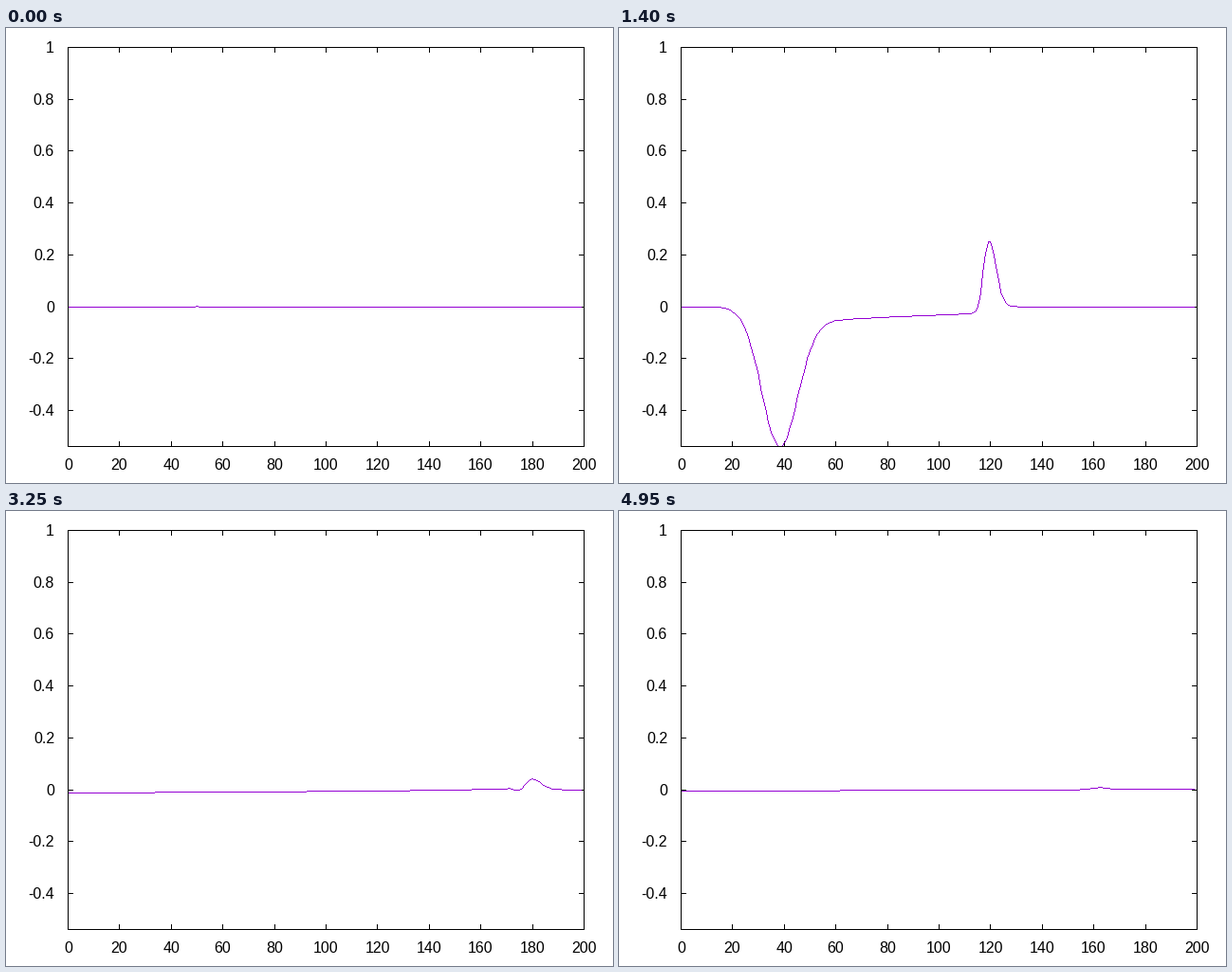
A matplotlib script that plays this animation: 640x480 px, repeating every 5000 ms.

```python
import numpy as np
import matplotlib.pyplot as plt
from matplotlib.animation import FuncAnimation
from matplotlib.collections import PolyCollection
from matplotlib.patches import Rectangle

WIDTH, HEIGHT, DPI = 640, 480, 100
LEFT, RIGHT, TOP, BOTTOM = 65, 609, 20, 441
X_MAX, Y_MIN, Y_MAX = 200, -0.53906, 1.0
TICK = 5
FRAMES, INTERVAL, STEPS = 100, 50, 5

CELLS, SOURCE, INTERFACE = 200, 50, 100
PERMITTIVITY, LOSS = 9.0, 0.01
CORNERS = np.array([[0, 0], [1, 0], [1, 1], [0, 1]])


def pulse(t):
    return np.exp(-(t - 30) ** 2 / 100)


def simulate():
    """1D FDTD: a pulse in free space meets a lossy dielectric half-space."""
    ez, hy = np.zeros(CELLS), np.zeros(CELLS)  # hy scaled by the impedance
    keep, curl = np.ones(CELLS), np.ones(CELLS)
    keep[INTERFACE:] = (1 - LOSS) / (1 + LOSS)
    curl[INTERFACE:] = 1 / PERMITTIVITY / (1 + LOSS)

    shots = []
    for t in range(STEPS * (FRAMES - 1) + 1):
        hy[:-1] += np.diff(ez)
        hy[SOURCE - 1] -= pulse(t)
        ez[0] = ez[1]  # absorbing left end
        ez[1:] = keep[1:] * ez[1:] + curl[1:] * np.diff(hy)
        ez[SOURCE] += pulse(t + 1)
        if t % STEPS == 0:
            shots.append(ez.copy())
    return shots


def nearest(v):
    return np.floor(np.asarray(v) + 0.5).astype(int)


def to_px(x):
    return nearest(LEFT + np.asarray(x) * (RIGHT - LEFT) / X_MAX)


def to_py(y):
    up = (np.clip(y, Y_MIN, Y_MAX) - Y_MIN) * (BOTTOM - TOP) / (Y_MAX - Y_MIN)
    return BOTTOM - nearest(up)


def trace_pixels(field):
    """Unit squares of a crisp one-pixel polyline through the field values."""
    pts = np.column_stack([to_px(np.arange(CELLS)), to_py(field)])
    runs = []
    for a, b in zip(pts[:-1], pts[1:]):
        n = np.abs(b - a).max()
        runs.append(nearest(a + np.outer(np.arange(n + 1) / n, b - a)))
    pixels = np.unique(np.concatenate(runs), axis=0)
    return (pixels[:, None, :] + CORNERS).astype(float)


fig = plt.figure(figsize=(WIDTH / DPI, HEIGHT / DPI), dpi=DPI, facecolor="white")
ax = fig.add_axes([0, 0, 1, 1])
ax.set_xlim(0, WIDTH)
ax.set_ylim(HEIGHT, 0)
ax.axis("off")


def bar(x0, y0, x1, y1, zorder):
    """Black bar covering the pixels x0..x1, y0..y1 inclusive."""
    ax.add_patch(Rectangle((x0, y0), x1 - x0 + 1, y1 - y0 + 1, facecolor="black",
                           linewidth=0, antialiased=False, zorder=zorder))


def label(x, y, text, ha):
    ax.text(x, y, text, ha=ha, va="baseline", color="black",
            family="Liberation Sans", fontsize=16 * 72 / DPI)


for value in range(0, X_MAX + 1, 20):
    px = int(to_px(value))
    bar(px, BOTTOM - TICK, px, BOTTOM, 1)
    bar(px, TOP, px, TOP + TICK, 1)
    label(px + 0.5, 466, str(value), "center")

for k in range(-2, 6):
    py = int(to_py(k / 5))
    bar(LEFT, py, LEFT + TICK, py, 1)
    bar(RIGHT - TICK, py, RIGHT, py, 1)
    label(51, py + 6, f"{k / 5:g}", "right")

for y in (TOP, BOTTOM):
    bar(LEFT, y, RIGHT, y, 3)
for x in (LEFT, RIGHT):
    bar(x, TOP, x, BOTTOM, 3)

shots = simulate()
trace = PolyCollection(trace_pixels(shots[0]), facecolors="#9400d3",
                       edgecolors="none", linewidths=0, antialiaseds=False, zorder=2)
ax.add_collection(trace, autolim=False)


def draw(frame):
    trace.set_verts(trace_pixels(shots[frame]))
    return (trace,)


anim = FuncAnimation(fig, draw, frames=FRAMES, interval=INTERVAL,
                     repeat=True, repeat_delay=0)
plt.show()
```
